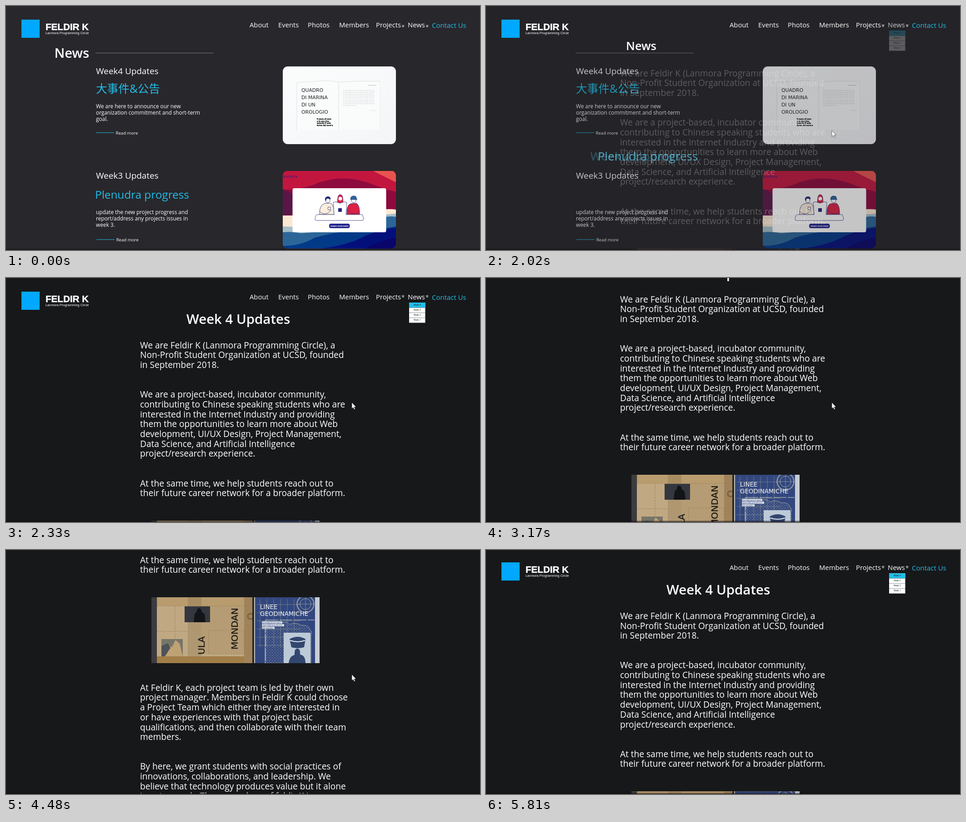
Animation of 1043x537 px, one loop 6290 ms. Source, as an HTML page:

```html
<!DOCTYPE html>
<html lang="en">
<head>
<meta charset="utf-8">
<title>Weekly updates</title>
<style>
html, body { margin: 0; width: 100%; height: 100%; overflow: hidden; background: #28272c; }
svg { display: block; width: 100%; height: 100%; }
text { font-family: "Open Sans", "Noto Sans", sans-serif; white-space: pre; }
.logo { font-family: "Liberation Sans", Arial, sans-serif; }
.wide { font-family: "DejaVu Sans", sans-serif; }
.cjk { font-family: "Open Sans", "Noto Sans CJK SC", "Noto Sans CJK", sans-serif; }
</style>
</head>
<body>
<svg id="stage" viewBox="0 0 1043 537"></svg>
<script>
const LOOP = 6290;
const CYAN = '#20bee8', INK = '#26277a';

// ---- drawing helpers ----
const text = (x, y, size, str, fill = '#fff', more = '') =>
  `<text x="${x}" y="${y}" font-size="${size}" fill="${fill}" ${more}>${str.replace(/&/g, '&amp;')}</text>`;
const para = (x, y, step, size, rows, fill, more) =>
  rows.map((row, i) => row ? text(x, y + i * step, size, row, fill, more) : '').join('');
const rect = (x, y, w, h, fill, more = '') =>
  `<rect x="${x}" y="${y}" width="${w}" height="${h}" fill="${fill}" ${more}/>`;
const path = (d, fill, more = '') => `<path d="${d}" fill="${fill}" ${more}/>`;
const line = (d, color, width = 1, more = '') =>
  path(d, 'none', `stroke="${color}" stroke-width="${width}" ${more}`);
const disc = (x, y, r, fill, more = '') => `<circle cx="${x}" cy="${y}" r="${r}" fill="${fill}" ${more}/>`;
const group = (id, body, more = '') => `<g id="${id}" ${more}>${body}</g>`;

// ---- header ----
const chevron = x => line(`M${x} 41.8l2.4 2.2 2.4-2.2M${x} 44.400l2.4 2.2 2.4-2.2`, '#d4d4d6', 1.1);

function header() {
  const nav = [[536, 'About'], [599, 'Events'], [664, 'Photos'], [733, 'Members'], [814, 'Projects']];
  return rect(34, 30, 40, 40, '#00a8ff') +
    text(87, 53.3, 20.6, 'FELDIR K', '#fff', 'class="logo" font-weight="700" stroke="#fff" stroke-width=".5"') +
    text(87, 62.2, 7.3, 'Lanmora Programming Circle', '#fff', 'class="logo"') +
    nav.map(([x, label]) => text(x, 46.8, 14.8, label)).join('') +
    text(937, 47.8, 15, 'Contact Us', CYAN) + group('chevrons', chevron(871.300) + chevron(924.300));
}

function dropdown() {
  let out = rect(887, 54, 35.500, 44.5, '#fff') + rect(887, 54, 35.500, 11.2, CYAN);
  for (let i = 0; i < 4; i++) {
    out += text(904.8, 61.2 + i * 11, 4.6, 'Week ' + (4 - i), '#16181a', 'text-anchor="middle"');
    if (i) out += line(`M887 ${54.3 + i * 11.1}h35.500`, '#77787a', .8);
  }
  return out;
}

// ---- news list ----
function bookCard() {
  const words = ['la carta bianca resta sul tavolo di casa nella sera', 'e il vento porta le voci del porto lungo la strada'];
  let faint = '';
  for (let i = 0; i < 9; i++) faint += text(741, 186.500 + i * 4.2, 3.2, words[i % 2].slice(0, i == 8 ? 22 : 50), '#c2c3c7');
  return rect(609, 133, 249, 171, 'url(#paper)') +
    path('M640 167h92l90-1v106l-90 1h-92z', '#fafbfb') +
    line('M640 275V168l42-2q30-4 50 2 40-4 91-2M732 168v104', '#dcdee0', .9) +
    line('M823 166v105', '#eceeef') + line('M797 174.500h18', '#a9abad', .8) +
    para(650, 189, 16, 10.8, ['QUADRO', 'DI MARINA', 'DI UN', 'OROLOGIO'], '#222326', 'class="wide"') +
    para(684, 250.2, 4.500, 3.9, ['il mare di sera', 'e la sua riva', 'quando il sole', 'torna dal nord a'], '#18181a',
      'class="wide" font-weight="700" stroke="#18181a" stroke-width=".35"') +
    faint + text(802, 231, 3, 'fine anno', '#c2c3c7');
}

function teamCard() {
  const pen = `stroke="${INK}" stroke-width=".8" stroke-linejoin="round"`;
  return rect(609, 363, 249, 171, '#c3163f') +
    path('M808 363h50v25z', '#e9534f') +
    path('M609 404Q650 406 690 388 745 370 800 390 830 402 858 409V470H609z', '#8e0a3e') +
    path('M609 403q14 4 24 14v46h-24z', '#5b1648') +
    path('M609 461h30l190-13q16-2 29 0v40H609z', '#fbe8d3') +
    path('M609 485l25 1 195-27 29-2v60H609z', '#a6bfc9') +
    path('M609 498q20-2 40 2 100-6 180-34 15-5 29-2v70H609z', '#2c6699') +
    path('M609 528q40 0 70-18 60-18 150-20l29-5v49H609z', '#023a88') +
    path('M690 534q60-6 100-28 40-16 68-18v46z', '#03107c') +
    path('M790 534q30-18 68-24v24z', '#09056a') +
    text(605, 377.500, 6.6, 'ENUDRA', '#2a2383', 'font-weight="700" letter-spacing="1.6"') +
    rect(630.500, 401, 206, 97, '#fff', 'rx="4"') +
    // three people at a table
    path('M690 459Q689 437 702 434.500L714 434q8 3 8 25z', '#fdeeda', pen) +
    disc(708, 428, 5, '#fff', pen) + path('M702 427q-1-7 6-8 7 0 6 7-4-3-8-2-2 1-1 5z', INK) +
    rect(708.500, 442.500, 5.500, 6, '#fff', pen) +
    path('M728 435q2-6 2-13 1-7 5.500-7t5.500 7q0 7 2 13z', '#dc2244', pen) + disc(735.500, 424, 4, '#fff') +
    path('M750 459q-1-20 8-24l13-1q8 5 7 25z', '#dc2244', pen) +
    disc(765, 428, 5, '#fff', pen) + path('M758 426q0-8 7-8t6 6l2 2z', '#2c6699', pen) +
    path('M720 432l6-1 9 3 9-3 6 1-2 28h-26z', '#fff', pen) + rect(731, 445, 8, 8, INK) +
    path('M684 459h38m26 0h36l3 9q0 4-4 4H684q-5 0-4-4.500l3-8.500', '#fff', pen) +
    line('M690 452q6 8 18 4l8-7M778 452q-6 8-18 4l-8-7', INK, .8) +
    rect(711, 479, 45.500, 10, '#23268c', 'rx="4"') +
    text(733.700, 485.500, 4, 'CREATE YOUR EVENT', '#fff', 'text-anchor="middle" font-weight="700"');
}

function newsList() {
  return line('M197 103.500h260', '#7d7d80') +
    text(198, 150.300, 18.9, 'Week4 Updates') +
    text(198, 190.500, 24.6, '大事件&公告', CYAN, 'class="cjk"') +
    para(198, 224.600, 14, 11.8, ['We are here to announce our new', 'organization commitment and short-term', 'goal.']) +
    line('M198 278.800h40', CYAN) + text(241.500, 282.500, 9.6, 'Read more') +
    text(198, 379.800, 18.9, 'Week3 Updates') +
    para(198, 457.700, 14, 11.8, ['update the new project progress and', 'report/address any projects issues in', 'week 3.']) +
    line('M199 514h40', CYAN) + text(242.700, 517.500, 9.6, 'Read more') +
    `<g clip-path="url(#top)">${bookCard()}</g><g clip-path="url(#low)">${teamCard()}</g>`;
}

// ---- week 4 article ----
function photo() {
  const grid = [];
  for (let i = 0; i < 6; i++) grid.push(`M${239 + i * 15} 4v106`, `M232 ${16 + i * 18}h96`);
  const shore = 'M250 145V70q8-14 20-8 6-8 18-6 10-4 16 4 14-6 26 2 16-2 19 10 6 6 2 12v61z';
  const spine = 'class="wide" stroke="#1d1a17" stroke-width=".4"';
  return rect(0, 0, 370, 145, '#a98b60') + rect(0, 0, 12, 145, '#3c3c40') +
    rect(13, 0, 209, 19, '#b99c6e') + rect(12, 19, 192, 111, '#c0a982') +
    rect(80, 0, 30, 145, '#6b5333', 'opacity=".2"') + rect(110, 19, 94, 106, '#b59c74') +
    rect(12, 130, 210, 15, '#a17d48') + rect(204, 0, 18, 145, '#a0835a') +
    line('M12 19h210M52 19v110M12 75h68M126 73h78v52h-78z', '#8d7650', .7, 'stroke-dasharray="4 2"') +
    rect(73, 20, 56, 35, '#34373d') + path('M93 55l2-18 5-6q0-7 5-7t5 7l7 6 2 18z', '#121418') +
    rect(22, 92, 47, 38, '#777569') + path('M24 130l12-25 9 5 8-16 9 8 7 28z', '#bfa274') + path('M22 107l14-6 6 10-12 19h-8z', '#4e5358') +
    disc(218, 42, 6, 'none', 'stroke="#5c4c30" stroke-width="3" stroke-dasharray="1.500 1"') +
    text(0, 0, 20, 'MONDAN', '#1d1a17', `${spine} transform="translate(190 115) rotate(-90)"`) +
    text(0, 0, 20, 'ULA', '#1d1a17', `${spine} transform="translate(117 126) rotate(-90)"`) +
    rect(222, 0, 6, 145, '#2a2723') + rect(226, 0, 2, 145, '#c9c8c3') +
    rect(228, 0, 132, 145, '#32477f') + rect(360, 0, 10, 145, '#c8ccd4') +
    path(shore, '#384c82', 'stroke="#c8c5a8" stroke-width="1" stroke-dasharray="3 1"') +
    path(shore, 'url(#dots)') +
    line(grid.join(''), '#98a08f', .6) +
    disc(339, 15, 18.500, 'none', 'stroke="#bcbda6" stroke-width="2.400" stroke-dasharray="2 1"') +
    disc(339, 15, 12, 'none', 'stroke="#bcbda6" stroke-width=".8"') +
    line('M320 15h38M339 0v34', '#bcbda6', .6) +
    line('M251 50h108M251 50v95', '#d9d8c4', 1.2, 'stroke-dasharray="28 3"') +
    para(239, 25.500, 15.300, 13.4, ['LINEE', 'GEODINAMICHE'], '#f2f3f4', 'class="wide"') +
    rect(243, 53, 45, 5, '#d6dbe4') + rect(243, 59, 49, 5, '#d6dbe4') + rect(243, 65, 28, 4.500, '#d6dbe4') +
    para(244, 57, 5.800, 4, ['la strada verso il mare', 'resta nella sera del sud', 'con noi tutti'], '#2d4481') +
    rect(291, 78, 59, 67, '#bccad8') +
    path('M304 92q18-10 35 0l-3 18q-14 4-28 0z', '#33466f') + line('M305 95q17 6 33 0', '#dbe3ea', 2) +
    path('M302 145q2-16 13-18-1-14 6-14t6 13q12 2 12 19z', '#33466f');
}

function article() {
  const first = ['We are Feldir K (Lanmora Programming Circle), a', 'Non-Profit Student Organization at UCSD, founded',
    'in September 2018.', '', '', 'We are a project-based, incubator community,',
    'contributing to Chinese speaking students who are', 'interested in the Internet Industry and providing',
    'them the opportunities to learn more about Web', 'development, UI/UX Design, Project Management,',
    'Data Science, and Artificial Intelligence', 'project/research experience.', '', '',
    'At the same time, we help students reach out to', 'their future career network for a broader platform.'];
  const second = ['At Feldir K, each project team is led by their own', 'project manager. Members in Feldir K could choose',
    'a Project Team which either they are interested in', 'or have experiences with that project basic',
    'qualifications, and then collaborate with their team', 'members.', '', '',
    'By here, we grant students with social practices of', 'innovations, collaborations, and leadership. We',
    'believe that technology produces value but it alone', 'is not enough. The core values of feldir K is',
    'innovation and collaboration, implementing', 'innovative ideas through team collaboration.'];
  return para(295, 154.700, 21.700, 19.1, first) + para(295, 739.700, 21.700, 19.1, second) +
    `<svg x="320" y="534" width="370" height="145">${photo()}</svg>` + dropdown();
}

// ---- scene ----
const stage = document.getElementById('stage');
stage.innerHTML = `<defs>
  <linearGradient id="paper" x2="1" y2="1"><stop stop-color="#fbfcfc"/><stop offset="1" stop-color="#f4f5f7"/></linearGradient>
  <pattern id="dots" width="6" height="6" patternUnits="userSpaceOnUse">${disc(2, 2, .7, '#b9bba8')}${disc(5, 5, .6, '#b9bba8')}</pattern>
  <clipPath id="top">${rect(609, 133, 249, 171, '#000', 'rx="11"')}</clipPath>
  <clipPath id="low">${rect(609, 362.500, 249, 171, '#000', 'rx="11"')}</clipPath></defs>` +
  rect(0, 0, 1043, 537, '#28272c') + rect(0, 0, 1043, 537, '#17181a', 'id="dark"') +
  group('page',
    group('list', newsList() + text(884, 46.800, 14.8, 'News')) +
    group('oldTitle', text(0, 0, 1, 'Plenudra progress', 'inherit')) +
    group('newTitle', text(0, 0, 1, 'Week 4 Updates', 'inherit', 'font-weight="600"')) +
    group('article', article()) + header() +
    group('heading', text(0, 0, 1, 'News'))) +
  rect(0, 534.500, 1043, 3, '#120c0f', 'opacity=".55"') +
  group('cursor',
    disc(0, -.5, 10, '#fdf76c', 'id="glow"') +
    path('M-1.500 1.500a1.500 1.500 0 0 1 3 0V7q1.500-1 2.700.3 1.400-.7 2.300.6 1.600-.4 1.600 1.400v3q0 2.400-1.200 4.600H.5Q-2 13-5.500 9.400-5.600 7.300-3.700 8L-1.500 10z', '#fff', 'id="hand" stroke="#222" stroke-width="1"') +
    path('M0 0V13.500L3.100 10.700 5.200 15.500 7.400 14.500 5.300 9.900H9.300z', '#fff', 'id="arrow" stroke="#111" stroke-width=".6"'));

const el = id => document.getElementById(id);
const [dark, page, list, articleEl, oldTitle, newTitle, heading, chevrons, cursor, glow, hand, arrow] =
  ['dark', 'page', 'list', 'article', 'oldTitle', 'newTitle', 'heading', 'chevrons', 'cursor', 'glow', 'hand', 'arrow'].map(el);

// ---- motion: [time, values...], each held until the next ----
const SCROLL = [[0, 0], [3170, 101], [3260, 350], [3330, 512], [4480, 430], [4580, 130], [4650, 0], [5230, 2.8]];
const POINTER = [[0], [520, 857, 408], [600, 836, 377], [680, 797, 325], [760, 771, 288], [840, 761, 274],
  [5140, 775, 288], [5230, 814, 327], [5320, 868, 380], [5410, 925, 433], [5500, 959, 463],
  [5650, 985, 487], [5730, 1019, 518], [5810]];
const FADE = [0, 1850, 1930, 2010, 2090, 2160, 2250, 2330].map(t => [t]);

const held = (table, t) => table.findLast(row => row[0] <= t);
const mix = (a, b, p) => a + (b - a) * p;
const smooth = x => x * x * (3 - 2 * x);
const show = (node, on) => node.setAttribute('visibility', on ? 'visible' : 'hidden');

function place(node, p, from, to) {
  const [x, y, size] = from.map((v, i) => mix(v, to[i], p));
  node.setAttribute('transform', `translate(${x} ${y}) scale(${size})`);
}

function draw(t) {
  const p = smooth(Math.min(1, Math.max(0, (held(FADE, t)[0] - 1850) / 480)));
  dark.setAttribute('opacity', p);
  list.setAttribute('opacity', 1 - p);
  articleEl.setAttribute('opacity', p);
  page.setAttribute('transform', `translate(0 ${-held(SCROLL, t)[1]})`);
  chevrons.setAttribute('transform', `translate(0 ${-4 * p})`);

  place(heading, p, [106.500, 114, 29], [884, 46.800, 14.8]);
  heading.setAttribute('font-weight', p < .9 ? 600 : 400);
  place(oldTitle, p, [196, 424, 24.3], [388, 100.800, 30.500]);
  place(newTitle, p, [171, 424, 24.3], [397, 100.800, 29.4]);
  oldTitle.setAttribute('font-weight', p < .3 ? 400 : 600);
  oldTitle.setAttribute('opacity', 1 - p);
  newTitle.setAttribute('opacity', p);
  const tint = `rgb(${mix(32, 255, p)},${mix(190, 255, p)},${mix(232, 255, p)})`;
  oldTitle.setAttribute('fill', tint);
  newTitle.setAttribute('fill', tint);

  const [, x, y] = held(POINTER, t);
  const seen = x !== undefined, over = seen && y < 304 && t < 1850;
  if (seen) cursor.setAttribute('transform', `translate(${x} ${y})`);
  show(hand, over);
  show(arrow, seen && !over);
  show(glow, t >= 1620 && t < 1850);
}

for (const node of [oldTitle, newTitle]) node.firstChild.removeAttribute('fill');

const start = performance.now();
function tick() {
  draw((performance.now() - start) % LOOP);
  requestAnimationFrame(tick);
}
tick();
</script>
</body>
</html>
```
